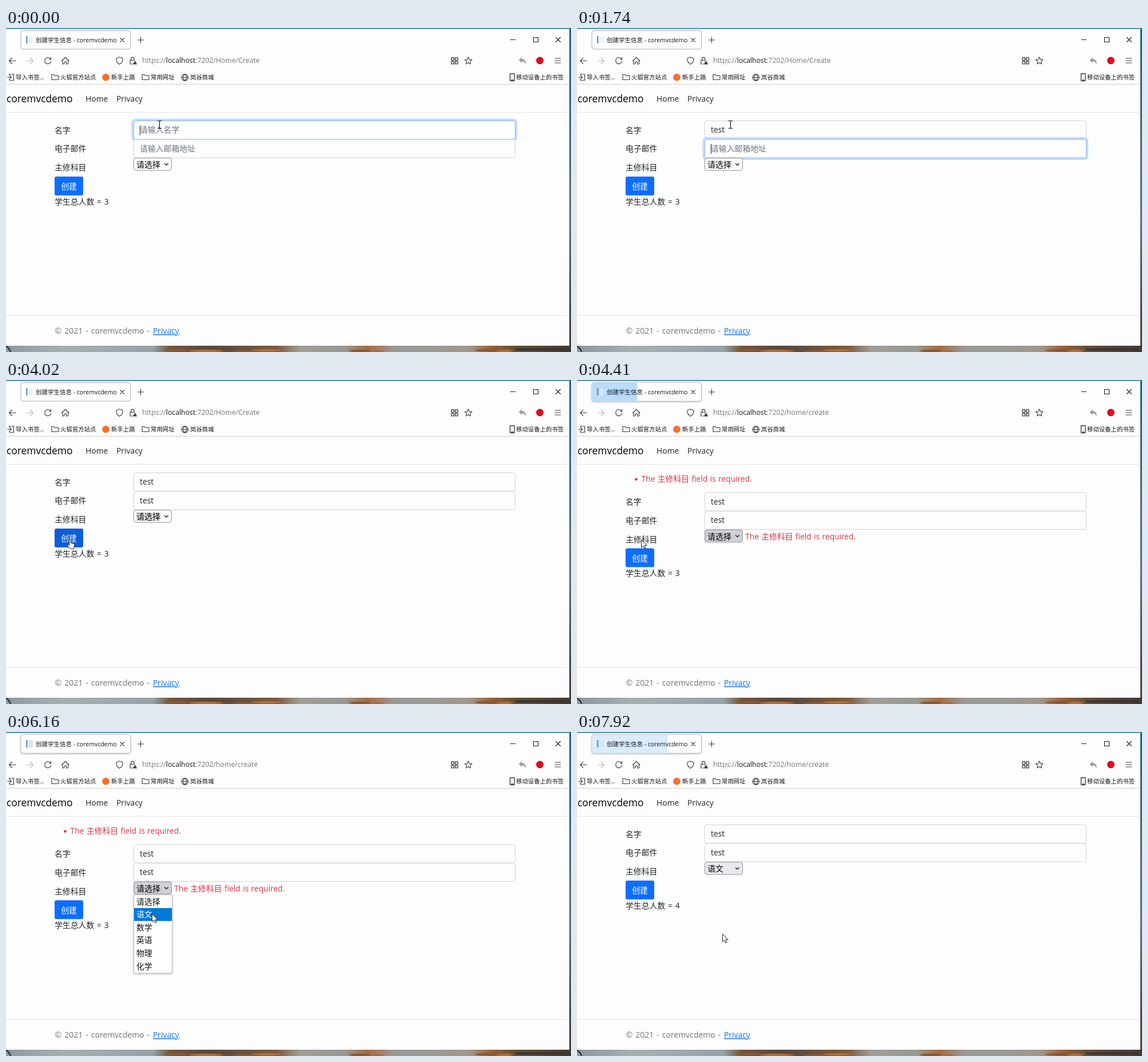
An HTML page for the animation above (8 s loop, 988 by 567 pixels).

```html
<!DOCTYPE html>
<html lang="zh-CN">
<head>
<meta charset="utf-8">
<title>创建学生信息</title>
<style>
html, body { margin: 0; width: 100%; height: 100%; overflow: hidden; background: #fdfdfd; }
svg { display: block; width: 988px; height: 567px; }
text { font-family: "Open Sans", "Noto Sans CJK SC", "Noto Sans CJK", sans-serif; white-space: pre; }
.icon { fill: none; stroke: #3c3c42; stroke-width: 1.15; stroke-linecap: round; stroke-linejoin: round; }
</style>
</head>
<body>
<svg viewBox="0 0 988 567" xmlns="http://www.w3.org/2000/svg">
  <defs>
    <linearGradient id="shore">
      <stop offset="0" stop-color="#8b9a9f"/><stop offset=".1" stop-color="#a5b1b0"/>
      <stop offset=".26" stop-color="#94a3a8"/><stop offset=".29" stop-color="#74553c"/>
      <stop offset=".36" stop-color="#54483f"/><stop offset=".48" stop-color="#7d5a3c"/>
      <stop offset=".52" stop-color="#a39d92"/><stop offset=".6" stop-color="#989893"/>
      <stop offset=".64" stop-color="#a36d43"/><stop offset=".69" stop-color="#999b99"/>
      <stop offset=".82" stop-color="#a0988c"/><stop offset=".86" stop-color="#946039"/>
      <stop offset=".91" stop-color="#5d4c3a"/><stop offset="1" stop-color="#403a34"/>
    </linearGradient>
    <linearGradient id="side" x2="0" y2="1">
      <stop offset="0" stop-color="#1d638c"/><stop offset=".3" stop-color="#3c6880"/>
      <stop offset=".6" stop-color="#56707e"/><stop offset=".85" stop-color="#3c4a52"/>
      <stop offset="1" stop-color="#4a4034"/>
    </linearGradient>
    <filter id="soft" x="-20%" y="-20%" width="140%" height="150%">
      <feDropShadow dx="0" dy="1" stdDeviation="1.5" flood-opacity=".3"/>
    </filter>
  </defs>
  <rect width="988" height="567" fill="url(#side)"/>
  <rect y="556" width="988" height="11" fill="url(#shore)"/>
  <g id="rocks"></g>
  <rect width="988" height="2" fill="#1d6a94"/>
  <rect y="1.5" width="985" height="554.5" fill="#fdfdfd"/>
  <g id="tab"></g>
  <g id="chrome"></g>
  <g id="page"></g>
  <g id="mouse"></g>
</svg>
<script>
const LOOP = 8000, BODY = 13.85, INK = '#212529', GREY = '#6c757d', RED = '#dc3545', BLUE = '#0d6efd';
const PAPER = '#fdfdfd';
const layer = id => document.getElementById(id);

const text = (x, y, s, size = BODY, fill = INK, extra = '') =>
  `<text x="${x}" y="${y}" font-size="${size}" fill="${fill}" ${extra}>${s}</text>`;
const rect = (x, y, w, h, fill, stroke = 'none', rx = 0, extra = '') =>
  `<rect x="${x}" y="${y}" width="${w}" height="${h}" rx="${rx}" fill="${fill}" stroke="${stroke}" ${extra}/>`;
const icon = (d, extra = '') => `<path class="icon" d="${d}" ${extra}/>`;
const dot = (x, y, r, fill) => `<circle cx="${x}" cy="${y}" r="${r}" fill="${fill}"/>`;
const line = (y, color) => rect(0, y, 985, 1, color);
const chevron = (x, y, color = '#222') =>
  icon(`M${x - 3} ${y - 1.5}l3 3 3-3`, `style="stroke:${color};stroke-width:1.4"`);

function rocks() {
  const spots = [[300, 22], [350, 30], [415, 18], [455, 26], [620, 20], [648, 12], [842, 22], [872, 14]];
  return spots.map(([x, w], i) =>
    `<ellipse cx="${x}" cy="${564 + i % 3}" rx="${w}" ry="2.2" fill="${i % 2 ? '#b06d38' : '#8d5630'}"/>`).join('') +
    icon('M0 557q6 3 8 10', 'style="stroke:#2c2622;stroke-width:2"') +
    rect(890, 561, 90, 3, '#38322d');
}

function chrome() {
  const mark = (x, s) => text(x, 90, s, 10.4, '#15141a');
  const folder = x => icon(`M${x} 90.5v-9h4l1.5 2h6.5v7z`);
  const small = (x, y) => icon(`M${x} ${y}h4.4v4.4h-4.4z`, 'style="stroke-width:1.3"');
  return [
    // window buttons
    icon('M882 20.5h8.5M922.5 16.5h8v8h-8zM961.5 16.5l8 8m0-8l-8 8', 'style="stroke:#222"'),
    icon('M230.5 21h10M235.5 16v10'),
    // navigation
    icon('M17 57.5H5.5m5-5l-5 5 5 5'),
    icon('M36.5 57.5H47.5m-5-5l5 5-5 5', 'style="stroke:#b9b9be"'),
    icon('M78 54.5a5.5 5.5 0 1 0 .5 4M78.5 51.5v3.5h-3.5'),
    icon('M97.5 57.5l6.2-6 6.2 6M99 56.5v6.5h3v-4h3.5v4h3v-6.5'),
    icon('M198.5 51l5.7 2.2c0 5-1.5 8.3-5.7 10.3-4.2-2-5.7-5.3-5.7-10.3z'),
    icon('M217 56.5h8.5v6.5h-8.5zM218.5 56v-2a2.7 2.7 0 0 1 5.4 0v2'),
    '<path d="M225.5 56.5l4.5 7.5h-9z" fill="#3c3c42" stroke="#fdfdfd" stroke-width=".8"/>',
    small(779, 52), small(785.6, 52), small(779, 58.5), small(785.6, 58.5),
    icon('M808.5 51l1.9 4.1 4.4.5-3.3 3 .9 4.4-3.9-2.2-3.9 2.2.9-4.4-3.3-3 4.4-.5z'),
    icon('M901.5 52.5l-4 3.8 4 3.8v-2.3q5-.5 6.5 4 .8-6.5-6.5-7z', 'style="stroke:#9a9a9e;fill:#9a9a9e"'),
    dot(933.5, 57, 6.5, '#d70e1c'),
    icon('M960 53h10m-10 4h10m-10 4h10'),
    // bookmarks
    icon('M6 83.5v-2.5h7.5v10.5h-7.5v-2.5M2.5 86.2h7m-2.5-2.5l2.5 2.5-2.5 2.5'),
    mark(17, '导入书签...'), folder(80), mark(95, '火狐官方站点'),
    dot(174.5, 86.2, 6.3, '#f4702b'), mark(184, '新手上路'),
    folder(238), mark(253, '常用网址'),
    icon('M307 86.5a5.8 5.8 0 1 0 11.6 0a5.8 5.8 0 1 0-11.6 0h11.6M312.8 80.7c-4 3-4 8.6 0 11.6 4-3 4-8.6 0-11.6'),
    mark(322, '岚谷商城'),
    icon('M881.5 80h7.5v12.5h-7.5zM884 91h2.5', 'style="stroke-width:1.4"'),
    mark(892, '移动设备上的书签'),
    line(98, '#cfcfd2'),
    // site header and footer
    text(1, 130, 'coremvcdemo', 17.4, '#000'),
    text(139, 128.5, 'Home', 13.9), text(193, 128.5, 'Privacy', 13.9),
    line(147, '#dfe2e5'), line(503, '#dfe2e5'),
    text(85.5, 535, '© 2021 - coremvcdemo -', 14, GREY, 'word-spacing="1.4"'),
    text(257, 535, 'Privacy', 13.9, BLUE, 'text-decoration="underline"')
  ].join('');
}

function tab(s) {
  const [reach, tint] = s.burst || [0, ''];
  return rect(26, 4.5, 191.5, 32.5, PAPER, s.sent ? '#c3c3c9' : '#a5adbd', 4, s.sent ? 'filter="url(#soft)"' : '') +
    (reach ? rect(26.5, 5, reach, 31.5, tint, 'none', 3.5) : '') +
    rect(35, 14, 2.5, 13, '#5b9bd0') + rect(39, 15, 8, 12, s.sent ? '#d3e6f3' : '#f0f4f7') +
    text(52, 25, '创建学生信息 - coremvcdemo', 10.5, '#15141a') +
    icon('M200 17.8l6.4 6.4m0-6.4l-6.4 6.4', 'style="stroke:#222"') +
    `<text x="238" y="61" font-size="12.27" fill="#77777c">https://<tspan fill="#15141a">localhost</tspan>:7202/${s.sent ? 'home/create' : 'Home/Create'}</text>`;
}

function field(y, value, hint, focus, caret) {
  const ring = focus ? rect(221.2, y - 1.8, 671, 36.6, 'none', '#c2dbfe', 5, 'stroke-width="3.6"') : '';
  const bar = caret ? rect(234 + [0, 5, 13, 19.5, 24.5][value.length], y + 8.5, 1, 17, '#111') : '';
  return ring + rect(223.5, y + .5, 667, 32, PAPER, focus ? '#86b7fe' : '#ced4da', 3.5) +
    text(234, y + 21.3, value || hint, BODY, value ? INK : GREY) + bar;
}

const WORDS = {
  t: '他 她 它 天 太 听 图', te: '特 忒 特别 特点 特色 特殊 特意',
  tes: '特殊 特色 特斯 特使 特首 特赦 特设', test: 'test 特殊 特色 特斯 特使 特首 特赦'
};

function candidates(key) {
  let x = 234, cells = '';
  WORDS[key].split(' ').forEach((word, i) => {
    const w = 36 + (word === 'test' ? 29 : word.length * 16);
    if (!i) cells += rect(x, 187.5, w, 38, '#76abcd');
    cells += text(x + 11, 212, i + 1, 15.5, i ? '#5b5d61' : '#2d4553') + text(x + 27.5, 212, word, 15.7, '#111');
    x += w;
  });
  const rule = at => rect(at, 188, 1, 37, '#d4d5d8');
  return rect(234, 187.5, x + 98 - 234, 38, '#f2f3f5', '#d7d8db') + cells + rule(x) + rule(x + 55) +
    icon(`M${x + 14} 203l-4.5 4 4.5 4`, 'style="stroke:#aaa"') +
    icon(`M${x + 41} 203l4.5 4-4.5 4`, 'style="stroke:#222"') +
    icon(`M${x + 70} 207a6.5 6.5 0 1 0 13 0a6.5 6.5 0 1 0-13 0m3.5 1.5q3 3.5 6 0m-5-4v.5m4-.5v.5`, 'style="stroke:#222"');
}

function menu(active) {
  const items = ['请选择', '语文', '数学', '英语', '物理', '化学'];
  return rect(223.5, 250.5, 67, 137, '#fff', '#bcbcc2', 0, 'filter="url(#soft)"') +
    items.map((s, i) => (i === active ? rect(224, 251 + i * 22.6, 66, 22.6, '#0078d7') : '') +
      text(228, 267 + i * 22.6, s, BODY, i === active ? '#fff' : '#111')).join('');
}

function page(s) {
  const warn = 'The 主修科目 field is required.';
  const style = 'word-spacing=".7"';
  // later fields cover the lower part of an earlier focus ring
  const form = text(85, 183.5, '名字') + text(85, 216, '电子邮件') + text(85, 249, '主修科目') +
    field(162, s.name, '请输入名字', s.focus === 0, s.caret && s.focus === 0) +
    field(194.5, s.mail, '请输入邮箱地址', s.focus === 1, s.caret && s.focus === 1);
  const select = rect(223.5, 227.7, 66, 21.5, s.fill, '#8f8f9d', 3.5) +
    (s.patch ? rect(227, 231, 44, 16, '#e6e6ea') : '') +
    text(228, 244, s.major, 14, '#000', 'font-weight="500"') + chevron(280.5, 238.8);
  const button = rect(85, 260, 50, 33, s.press || BLUE, 'none', 3) + text(96.2, 282, '创建', BODY, '#fff');
  return (s.error ? dot(103.5, 173.8, 2.4, RED) + text(112.5, 178, warn, BODY, RED, style) : '') +
    `<g transform="translate(0 ${s.error ? 34.5 : 0})">` + form + select + button +
    (s.error ? text(294, 244, warn, BODY, RED, style) : '') +
    text(85, 308.5, '学生总人数 = ' + s.total, BODY, INK, 'word-spacing="1.2"') +
    (s.menu >= 0 ? menu(s.menu) : '') + '</g>' +
    (s.line ? rect(234, 185, s.line, 1, '#555') : '') + (s.ime ? candidates(s.ime) : '') +
    (s.status ? rect(-1, 538.5, 136, 17.5, '#f0f0f4', '#c8c8cd', 2) + text(4, 551, '正在等待 localhost…', 10.4, '#3c3c42') : '');
}

const CURSORS = {
  beam: icon('M-3 -6.5h2.5q1 0 1 1v11q0 1-1 1h-2.5M4 -6.5h-2.5q-1 0-1 1M4 6.5h-2.5q-1 0-1-1', 'style="stroke:#111"'),
  arrow: '<path d="M.5 .5v13.5l3.1-2.9 2.2 5 2.2-1-2.2-4.8h4.3z" fill="#fff" stroke="#222" stroke-width="1"/>',
  hand: '<path d="M-1.3 1q1.3-2 2.6 0v5l5 1.2q1.7.5 1.5 2.3l-1 6.5h-7l-4.5-5.5q0-2 2-1.3l1.4 1.3z" fill="#fff" stroke="#222" stroke-width="1"/>'
};

// time, x, y, cursor
const PATH = [
  [0, 268, 169, 'beam'], [2730, 244, 213, 'beam'], [2880, 232, 240, 'arrow'], [3060, 162, 274, 'arrow'],
  [3210, 134, 299, 'beam'], [3360, 126, 290, 'hand'], [3480, 117, 283, 'hand'], [3600, 112, 279, 'hand'],
  [4410, 112, 279, 'arrow'], [4800, 130, 282, 'arrow'], [4920, 165, 286, 'arrow'], [5070, 195, 288, 'arrow'],
  [5220, 215, 288, 'arrow'], [5370, 232, 281, 'arrow'], [5520, 242, 278, 'arrow'], [5850, 244, 290, 'arrow'],
  [6000, 250, 305, 'arrow'], [6150, 255, 318, 'arrow'], [6410, 256, 325, 'arrow'], [6930, 220, 322, 'arrow'],
  [7060, 165, 316, 'arrow'], [7200, 114, 310, 'hand'], [7800, 180, 335, 'arrow'], [7920, 254, 353, 'arrow']
];

const HOVER = '#0b5ed7', ACTIVE = '#0a58ca', NEAR = [79, '#b9dcfd'], FAR = [132, '#daecfe'], FULL = [190.5, '#f1f8ff'];

// each step overrides what came before it
const STEPS = [
  [0, { name: '', mail: '', focus: 0, caret: 1, fill: PAPER, major: '请选择', total: 3, menu: -1 }],
  [250, { name: 't', line: 5, caret: 0 }],
  [400, { ime: 't' }],
  [530, { name: 'te', line: 13, ime: 'te' }],
  [680, { name: 'tes', line: 19, ime: 'tes' }],
  [800, { name: 'test', line: 24, ime: 'test' }],
  [1080, { line: 0, ime: '', caret: 1 }],
  [1220, { focus: 1, caret: 0 }],
  [1350, { caret: 1 }],
  [1620, { mail: 't' }],
  [1740, { mail: '' }],
  [2180, { mail: 't' }],
  [2330, { mail: 'te' }],
  [2460, { mail: 'tes' }],
  [2610, { mail: 'test' }],
  [2880, { patch: 1, caret: 0 }],
  [3360, { press: HOVER }],
  [3750, { caret: 1 }],
  [3870, { press: ACTIVE, focus: -1 }],
  [4020, { press: HOVER, caret: 0 }],
  [4290, { status: 1, sent: 1 }],
  [4410, { status: 0, press: '', patch: 0, error: 1, fill: '#d0d0d7', burst: NEAR }],
  [4530, { burst: FAR }],
  [4650, { burst: FULL }],
  [4800, { burst: null }],
  [5700, { menu: 0 }],
  [6000, { menu: 1 }],
  [6560, { menu: -1, major: '语文' }],
  [6680, { fill: '#e9e9ed' }],
  [7200, { press: HOVER }],
  [7350, { press: ACTIVE }],
  [7530, { press: HOVER }],
  [7680, { status: 1 }],
  [7800, { status: 0, press: '', error: 0, total: 4, burst: NEAR }],
  [7920, { burst: FAR }]
];

const shown = {};
function put(id, html) {
  if (shown[id] !== html) layer(id).innerHTML = shown[id] = html;
}

function draw(t) {
  const s = Object.assign({}, ...STEPS.filter(([at]) => at <= t).map(step => step[1]));
  const [, x, y, kind] = PATH.filter(([at]) => at <= t).pop();
  put('tab', tab(s));
  put('page', page(s));
  put('mouse', `<g transform="translate(${x} ${y})">${CURSORS[kind]}</g>`);
}

put('rocks', rocks());
put('chrome', chrome());
const start = performance.now();
function tick() {
  draw((performance.now() - start) % LOOP);
  requestAnimationFrame(tick);
}
tick();
</script>
</body>
</html>
```
